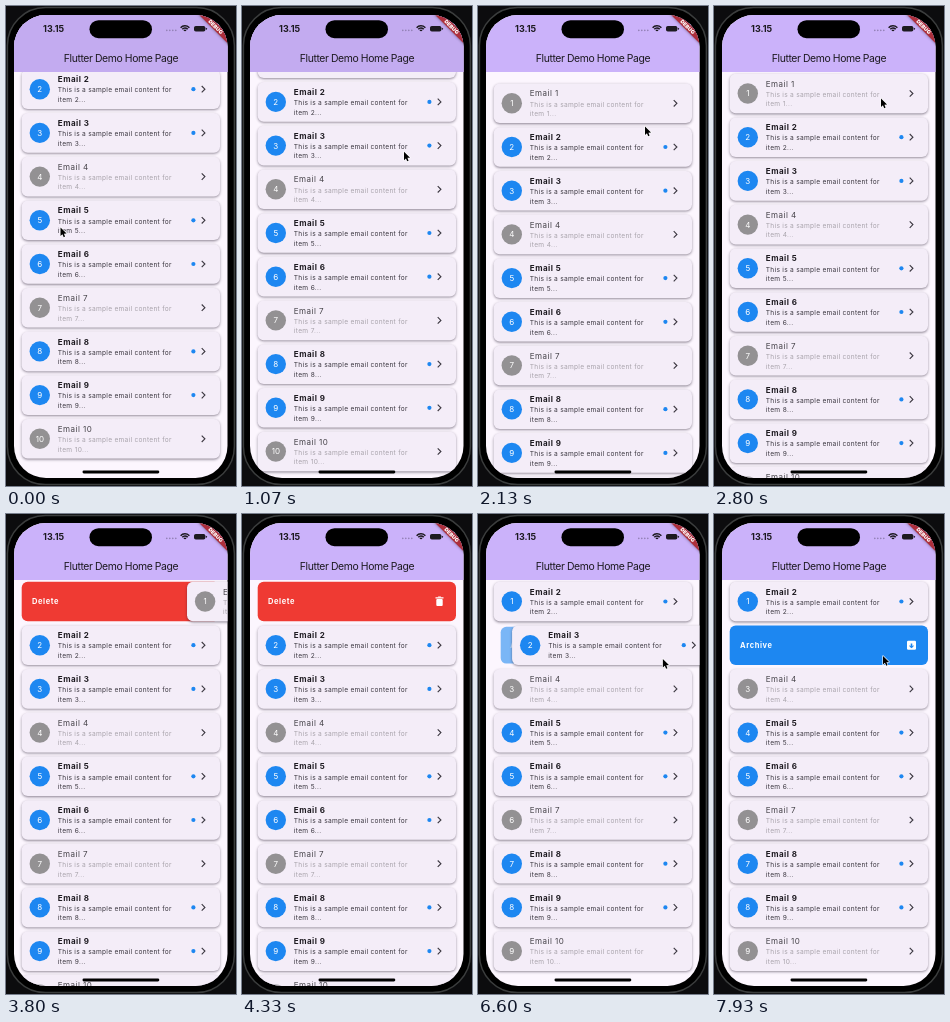
An HTML page with a canvas that plays this animation: 230x480 px, repeating every 8000 ms.

```html
<!DOCTYPE html>
<html lang="en">
<head>
<meta charset="utf-8">
<title>Swipe list demo</title>
<style>
  html, body { margin: 0; width: 100%; height: 100%; overflow: hidden; background: #000; }
  canvas { display: block; width: 230px; height: 480px; }
</style>
</head>
<body>
<canvas id="stage"></canvas>
<script>
const W = 230, H = 480, LOOP = 8000;
const SCREEN = { x: 8, y: 9, w: 213.5, h: 463, r: 32 };
const CARD = { x: 15.7, w: 198.3, h: 39.6, r: 6 };
const FIRST = 87.5, PITCH = 43.7, BAR_BOTTOM = 66;
const BLUE = '#1d87f1', GREY = '#939193', RED = '#ef3a33', INK = '#1d1a20';

const canvas = document.getElementById('stage');
const ctx = canvas.getContext('2d');
const dpr = Math.max(1, window.devicePixelRatio || 1);
canvas.width = W * dpr;
canvas.height = H * dpr;

const clamp = (v, a = 0, b = 1) => Math.min(b, Math.max(a, v));
const ease = p => p * p * (3 - 2 * p);
// Eased change by `amount` between two times; motions are sums of these.
const glide = (t, from, to, amount) => amount * ease(clamp((t - from) / (to - from)));

// A slow drag, then a quick fling off the screen.
const swipe = (t, from, to, release) =>
  glide(t, from, to, 50) + glide(t, release, release + 205, 164);
const deleteX = t => swipe(t, 3150, 3650, 3670);
const archiveX = t => swipe(t, 6330, 6990, 7200);

const pull = t => glide(t, 850, 1650, 68);
const scroll = t => pull(t) - 48 - glide(t, 1650, 2600, 20);

function cursorAt(t) {
  const x = 54.5 + glide(t, 270, 850, 107.5) + glide(t, 1650, 2130, 5)
    + Math.min(deleteX(t), 80) + glide(t, 4300, 5100, -95)
    + glide(t, 5530, 6330, 14.5) + Math.min(archiveX(t), 70) + glide(t, 7450, 7930, -67.5);
  const y = 221.5 + glide(t, 270, 850, -88.5) + pull(t)
    + glide(t, 1650, 2130, -80.5) + glide(t, 2130, 2700, -28)
    + glide(t, 4300, 5100, 56.5) + glide(t, 5530, 7500, -7);
  return [x, y];
}

function round(x, y, w, h, r, fill) {
  ctx.beginPath();
  ctx.roundRect(x, y, w, h, Math.max(0, Math.min(r, h / 2)));
  if (fill) { ctx.fillStyle = fill; ctx.fill(); }
}

function disc(x, y, r, fill) {
  ctx.beginPath();
  ctx.arc(x, y, r, 0, Math.PI * 2);
  ctx.fillStyle = fill;
  ctx.fill();
}

function line(points, color, width) {
  ctx.beginPath();
  points.forEach(([x, y]) => ctx.lineTo(x, y));
  ctx.strokeStyle = color;
  ctx.lineWidth = width;
  ctx.stroke();
}

function text(str, x, y, size, color, { weight = 400, gap = 0, align = 'left' } = {}) {
  ctx.font = `${weight} ${size}px Inter, sans-serif`;
  ctx.letterSpacing = gap + 'px';
  ctx.textAlign = align;
  ctx.fillStyle = color;
  ctx.fillText(str, x, y);
}

function shadow(color, blur, dy = 0) {
  ctx.shadowColor = color;
  ctx.shadowBlur = blur * dpr;
  ctx.shadowOffsetY = dy * dpr;
}

function drawCard(id, number, cy, dx) {
  const unread = id % 3 !== 1;
  const sub = unread ? '#39353e' : '#a8a3ab';
  ctx.save();
  ctx.translate(dx, cy);
  shadow('rgba(35,25,45,.48)', 2.6, 1.1);
  round(CARD.x, -CARD.h / 2, CARD.w, CARD.h, CARD.r, '#f4edf8');
  shadow('transparent', 0);
  disc(33.8, 0, 10.2, unread ? BLUE : GREY);
  text(String(number), 33.8, 2.9, 8, '#fff', { align: 'center' });
  text('Email ' + id, 51.8, -6.9, 8, unread ? INK : '#454248',
    { weight: unread ? 700 : 400, gap: 0.48 });
  text('This is a sample email content for', 51.8, 3.2, 6.6, sub, { gap: 0.28 });
  text('item ' + id + '...', 51.8, 12.8, 6.6, sub, { gap: 0.34 });
  if (unread) disc(187.4, 0, 2.1, BLUE);
  line([[195.7, -3.2], [198.9, 0], [195.7, 3.2]], '#3d3942', 1.15);
  ctx.restore();
}

function archiveIcon(x, y) {
  round(x - 4.5, y - 4.5, 9, 9, 1.2, '#fff');
  line([[x, y - 1.8], [x, y + 2.2]], BLUE, 1.6);
  line([[x - 2, y + 0.4], [x, y + 2.2], [x + 2, y + 0.4]], BLUE, 1.1);
}

function trashIcon(x, y) {
  round(x - 3.2, y - 2.4, 6.4, 7, 1, '#fff');
  round(x - 4, y - 4.3, 8, 1.2, 0, '#fff');
  round(x - 1.4, y - 5, 2.8, 1, 0, '#fff');
}

// Coloured panel that grows in behind a dragged card.
function drawAction(label, cy, dx, open, color, icon) {
  const p = clamp(dx / 62), s = 0.9 + 0.1 * p, h = CARD.h * open;
  if (h < 0.3) return;
  ctx.save();
  ctx.globalAlpha = 0.4 + 0.6 * p;
  ctx.translate(115, cy - CARD.h / 2 + h / 2);
  ctx.scale(s, s);
  ctx.translate(-115, 0);
  round(CARD.x, -h / 2, CARD.w, h, CARD.r, color);
  ctx.clip();
  text(label, 26, 2.8, 7.5, '#fff', { weight: 700, gap: 0.6 });
  icon(197.5, 0);
  ctx.restore();
}

function drawList(t) {
  const gone = glide(t, 4700, 5100, 1), removed = gone === 1;
  ctx.save();
  ctx.beginPath();
  ctx.rect(0, BAR_BOTTOM, W, H);
  ctx.clip();
  for (let id = removed ? 2 : 1; id <= 10; id++) {
    const cy = FIRST + scroll(t) + (id - 1 - (id > 1 ? gone : 0)) * PITCH;
    const dx = id === 1 ? deleteX(t) : id === 3 ? archiveX(t) : 0;
    if (dx > 0.1) {
      if (id === 1) drawAction('Delete', cy, dx, 1 - gone, RED, trashIcon);
      else drawAction('Archive', cy, dx, 1, BLUE, archiveIcon);
    }
    if (dx < 210) drawCard(id, removed ? id - 1 : id, cy, dx);
  }
  ctx.restore();
}

function drawStatus() {
  text('13.15', 37, 26.2, 9, INK, { weight: 700 });
  round(83.5, 14.2, 62.5, 18, 9, '#000');
  for (let i = 0; i < 4; i++) disc(160.8 + i * 3, 24.4, 0.8, '#9180b4');
  for (let r = 1.4; r < 7; r += 2.3) {
    ctx.beginPath();
    ctx.arc(179, 25.8, r, -Math.PI * 0.76, -Math.PI * 0.24);
    ctx.strokeStyle = INK;
    ctx.lineWidth = 1.5;
    ctx.stroke();
  }
  round(188, 20, 11.4, 5.6, 1.8, INK);
  round(200, 21.8, 0.8, 2, 0.4, INK);
}

function drawBanner() {
  ctx.save();
  ctx.translate(SCREEN.x + SCREEN.w, SCREEN.y);
  ctx.rotate(Math.PI / 4);
  shadow('rgba(0,0,0,.45)', 3);
  ctx.fillStyle = '#ad2f3c';
  ctx.fillRect(-24, 13.4, 48, 6.6);
  shadow('transparent', 0);
  text('DEBUG', 0, 18.6, 5.2, '#fff', { weight: 900, align: 'center' });
  ctx.restore();
}

function drawCursor(x, y) {
  ctx.save();
  ctx.translate(x, y);
  ctx.scale(0.92, 0.92);
  ctx.beginPath();
  [[0, 0], [0, 9.2], [2.1, 7.3], [3.5, 10.5], [5, 9.9], [3.7, 6.7], [6.6, 6.5]]
    .forEach(([a, b]) => ctx.lineTo(a, b));
  ctx.closePath();
  ctx.lineJoin = 'round';
  ctx.strokeStyle = '#fff';
  ctx.lineWidth = 1.3;
  ctx.stroke();
  ctx.fillStyle = '#000';
  ctx.fill();
  ctx.restore();
}

function drawBody() {
  ctx.fillStyle = '#0c0c0e';
  ctx.fillRect(0, 0, W, H);
  round(1.4, 1.6, 227, 477, 38, '#000');
  ctx.strokeStyle = '#3b3d3d';
  ctx.lineWidth = 1.5;
  ctx.stroke();
}

function draw(t) {
  ctx.setTransform(dpr, 0, 0, dpr, 0, 0);
  drawBody();
  ctx.save();
  round(SCREEN.x, SCREEN.y, SCREEN.w, SCREEN.h, SCREEN.r, '#fcf6fe');
  ctx.clip();
  drawList(t);
  ctx.fillStyle = '#cbb2fa';
  ctx.fillRect(0, 0, W, BAR_BOTTOM);
  // The bar darkens while content sits beneath it.
  ctx.globalAlpha = clamp(-scroll(t) / 3);
  ctx.fillStyle = '#c3abf0';
  ctx.fillRect(0, 0, W, BAR_BOTTOM);
  ctx.globalAlpha = 1;
  text('Flutter Demo Home Page', 115, 55.6, 10.4, INK, { gap: -0.4, align: 'center' });
  drawStatus();
  drawBanner();
  round(76.5, 464.6, 76.8, 2.8, 1.4, '#000');
  ctx.restore();
  drawCursor(...cursorAt(t));
}

const start = performance.now();
function tick() {
  draw((performance.now() - start) % LOOP);
  requestAnimationFrame(tick);
}
tick();
</script>
</body>
</html>
```
